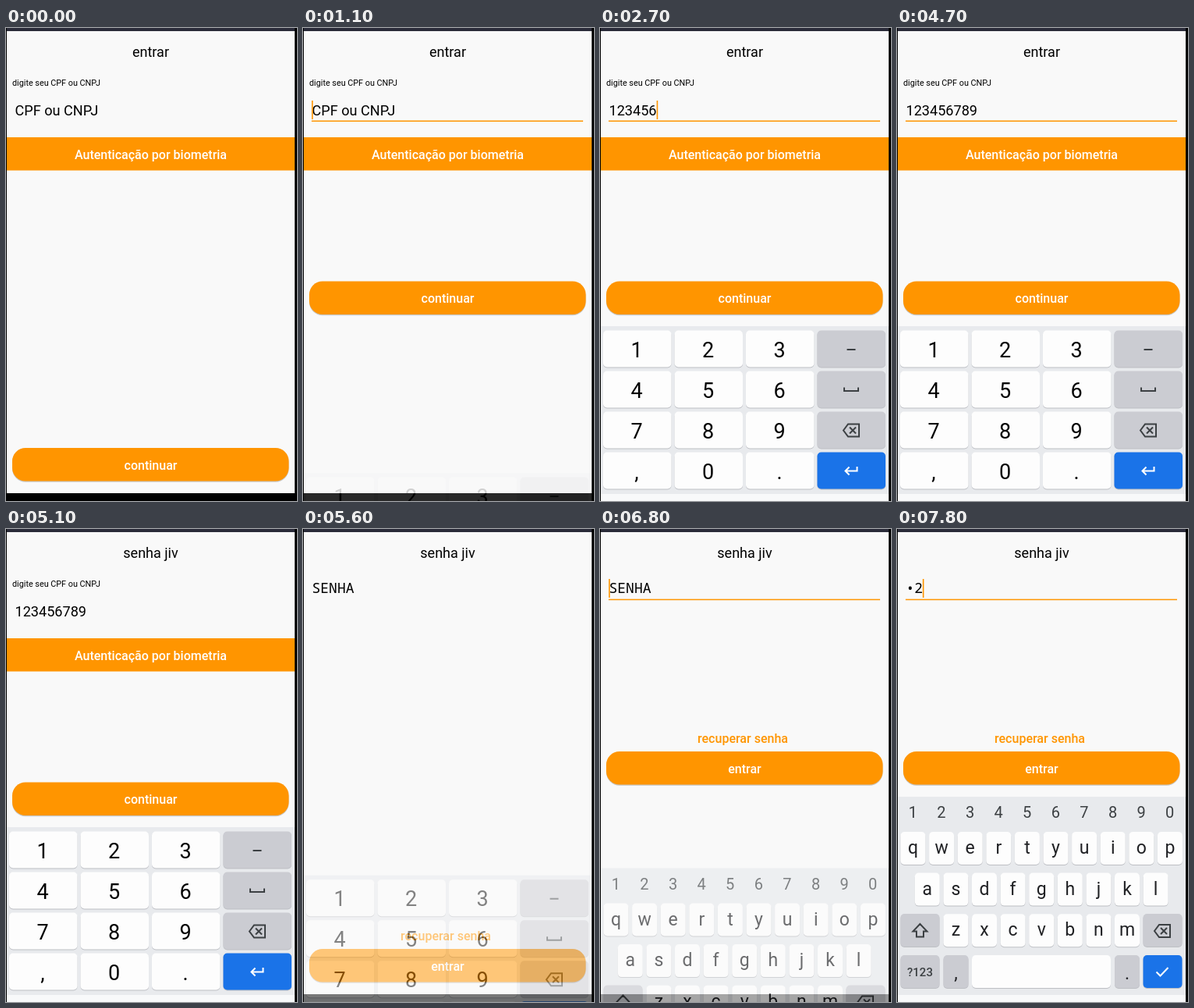
Write an HTML page that moves like this. It is 373 px wide and 606 px high and loops after 8000 ms.

```html
<!DOCTYPE html>
<html lang="pt-BR">
<head>
<meta charset="utf-8">
<style>
  html, body { margin: 0; width: 100%; height: 100%; overflow: hidden; background: #000; }
  svg { display: block; }
  text { font: 18px Roboto, sans-serif; white-space: pre; }
  .mid { text-anchor: middle; }
  .label { font-size: 10.8px; }
  .field { font-size: 18.1px; }
  .mono { font: 18px "Noto Sans Mono", monospace; }
  .strong { font-weight: 500; font-size: 16px; fill: #fff; text-anchor: middle; }
  .link { fill: #ff9500; }
  .digit { font-size: 27px; }
  .letter { font-size: 23px; fill: #202124; }
  .small { font-size: 20px; fill: #3c4043; }
  .mode { font-size: 15px; font-weight: 500; fill: #3c4043; }
  .icon { fill: none; stroke: #3c4043; stroke-width: 2; }
  .white { stroke: #fff; }
</style>
</head>
<body>
<svg width="373" height="606">
  <rect x="1" width="369" height="4" fill="#2a2b39"/>
  <rect x="1" y="4" width="369" height="592" fill="#f9f9f9"/>
  <text id="title1" class="mid" x="185.5" y="36.5">entrar</text>
  <text id="title2" class="mid" x="185.5" y="36.5">senha jiv</text>

  <g id="login">
    <text class="label" x="8" y="73.5">digite seu CPF ou CNPJ</text>
    <text id="cpf" class="field" x="11.5" y="111.5"></text>
    <rect id="line1" x="11" y="118.5" width="348" height="1.5" fill="#ff9500"/>
    <rect id="caret1" y="93" width="1.6" height="24" fill="#ff9500"/>
    <rect x="1" y="140" width="369" height="42.5" fill="#ff9500"/>
    <text class="strong" x="185.5" y="167.5">Autenticação por biometria</text>
    <g id="next"></g>
  </g>

  <g id="secret">
    <text id="pass" class="mono" x="11.5" y="82"></text>
    <rect id="line2" x="11" y="89.7" width="348" height="1.5" fill="#ff9500"/>
    <rect id="caret2" y="64" width="1.6" height="24" fill="#ff9500"/>
    <g id="enter"></g>
  </g>

  <g id="numpad"></g>
  <g id="qwerty"></g>
  <path d="M0 0h1v606h-1zM370 0h3v606h-3z"/>
</svg>
<script>
const $ = id => document.getElementById(id);
const set = (id, name, value) => $(id).setAttribute(name, value);
const show = (id, on) => set(id, 'opacity', +on);
const move = (id, x, y) => set(id, 'transform', `translate(${x} ${y})`);

const GRAY = '#cbccd2', BLUE = '#1a73e8', WHITE = '#fdfdfd';
const rect = (x, y, w, h, fill, r = 0) =>
  `<rect x="${x}" y="${y}" width="${w}" height="${h}" rx="${r}" fill="${fill}"/>`;
const text = (s, x, y, cls) => `<text class="${cls}" x="${x}" y="${y}">${s}</text>`;
const icon = (d, cls = '') => `<path class="icon ${cls}" d="${d}"/>`;
const key = (x, y, w, h, fill = WHITE) =>
  rect(x, y + 1, w, h, '#bdbfc4', 5) + rect(x, y, w, h, fill, 5);
const backspace = (x, y) =>
  icon(`M${x - 10} ${y}l6 -8h14v16h-14zM${x - 2} ${y - 4}l8 8m0 -8l-8 8`);
const board = top =>
  rect(1, top, 369, 606 - top, '#e8eaed') + rect(1, 597, 369, 9, '#f8f9fa');

const button = label =>
  rect(8, 539.2, 354.5, 42.5, '#0003', 17) +
  `<rect class="face" x="8" y="538" width="354.5" height="42.5" rx="17" fill="#ff9500"/>` +
  text(label, 185.5, 565.7, 'strong');

function numpad() {
  let out = board(382);
  ['123–', '456 ', '789 ', ',0. '].forEach((row, r) => [...row].forEach((c, i) => {
    const x = 4 + i * 91.5, y = 387.5 + r * 52;
    out += key(x, y, 87.5, 47, i < 3 ? WHITE : r < 3 ? GRAY : BLUE);
    if (i < 3) out += text(c, x + 43, y + 34, 'mid digit');
  }));
  return out + icon('M316.500 412h11') + icon('M313 460.500v4.500h18v-4.500') + backspace(322, 515.5) +
    icon('M329.500 562v5.500h-15m5 -5l-5 5l5 5', 'white');
}

function qwerty() {
  let out = board(343);
  [...'1234567890'].forEach((c, i) => out += text(c, 20.3 + i * 36.6, 370.3, 'mid small'));
  ['qwertyuiop', 'asdfghjkl', 'zxcvbnm'].forEach((row, r) => [...row].forEach((c, i) => {
    const x = [4.5, 22.8, 59.4][r] + i * 36.6, y = 388 + r * 52.6;
    out += key(x, y, 32, 42) + text(c, x + 16, y + 28, 'mid letter');
  }));
  for (const [x, y, w, fill] of [
    [4.5, 493, 50, GRAY], [315.5, 493, 50, GRAY], [4.5, 546, 50, GRAY], [59.5, 546, 32, GRAY],
    [96, 546, 178, WHITE], [279, 546, 32, GRAY], [315.5, 546, 50, BLUE]
  ]) out += key(x, y, w, 42, fill);
  return out + text('?123', 29.5, 573, 'mid mode') + text(',', 75.5, 577, 'mid letter') +
    text('.', 295, 577, 'mid letter') + backspace(340, 515) +
    icon('M29.500 506l-9 9.500h4.500v7h9v-7h4.500z') + icon('M332.500 567.500l5 5l10 -10.500', 'white');
}

$('next').innerHTML = button('continuar');
$('enter').innerHTML = text('recuperar senha', 183, 526.5, 'strong link') + button('entrar');
$('numpad').innerHTML = numpad();
$('qwerty').innerHTML = qwerty();

const clamp = v => Math.max(0, Math.min(1, v));
const within = (t, a, b) => t >= a && t < b;

function keyboard(id, height, hidden, opacity) {
  move(id, 0, height * hidden);
  show(id, opacity);
}

const typed = [2000, 2000, 2100, 2300, 2500, 2700, 2900, 3000, 3300];

function draw(t) {
  const second = t >= 5500;
  show('login', !second);
  show('secret', second);

  const swap = clamp((t - 4900) / 200);
  show('title1', 1 - swap);
  show('title2', swap);

  // document number
  const n = typed.filter(at => t >= at).length;
  $('cpf').textContent = n ? '123456789'.slice(0, n) : 'CPF ou CNPJ';
  set('caret1', 'x', n ? 11.6 + n * 10.17 : 11.2);
  show('line1', within(t, 800, 5100));
  show('caret1', within(t, 800, 1300) || within(t, 2000, 3800) || within(t, 4200, 4700));
  move('next', 0, t < 1100 ? 0 : -213.5);
  $('next').querySelector('.face').setAttribute('fill', within(t, 4900, 5100) ? '#ffa62b' : '#ff9500');

  // password
  const chars = t < 7600 ? 0 : t < 7800 ? 1 : 2;
  $('pass').textContent = ['SENHA', '1', '•2'][chars];
  set('caret2', 'x', chars ? 11.3 + chars * 10.8 : 11.2);
  show('line2', t >= 6600 ? 1 : t >= 6500 ? 0.5 : 0);
  show('caret2', within(t, 6600, 7100) || t >= 7600);
  move('secret', t < 5600 ? 15 : 0, 0);
  move('enter', 0, t < 5600 ? -213.5 : t < 6800 ? 0 : -253);

  // keyboards decelerate in, accelerate out
  const enterPad = (1 - clamp((t - 1083) / 300)) ** 3;
  const leavePad = clamp((t - 5495) / 200);
  if (second) keyboard('numpad', 224, leavePad ** 2, t >= 5700 ? 0 : 1 - leavePad);
  else keyboard('numpad', 224, enterPad, t < 1100 ? 0 : 1 - enterPad);
  const enterKeys = (1 - clamp((t - 6711) / 300)) ** 3;
  keyboard('qwerty', 263, enterKeys, t < 6800 ? 0 : 1 - enterKeys);
}

const start = performance.now();
function tick() {
  const t = (performance.now() - start) % 8000;
  draw(Math.floor(t / 100) * 100);
  requestAnimationFrame(tick);
}
tick();
</script>
</body>
</html>
```
